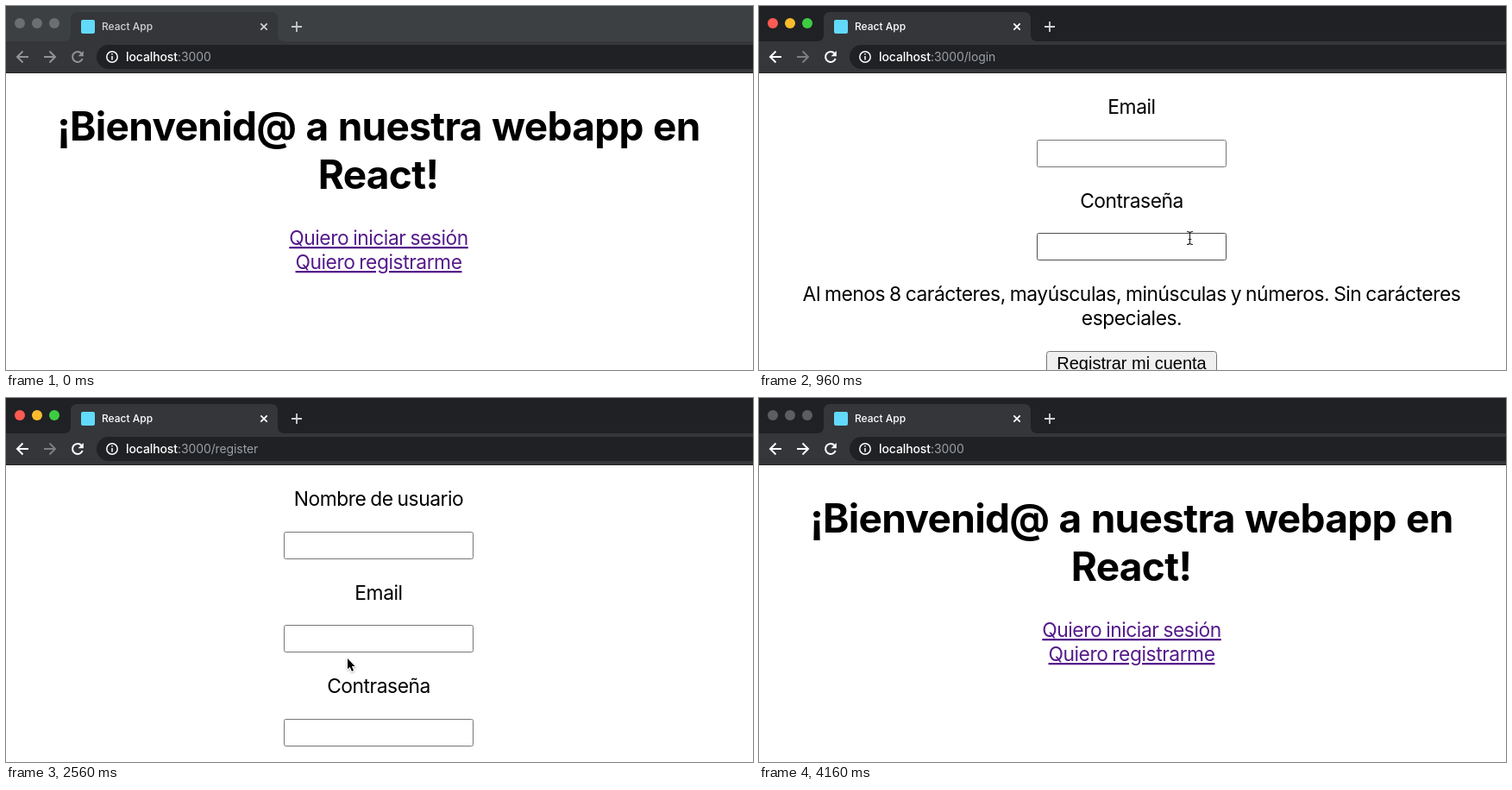
Animation, 866 px wide and 422 px high, one loop 4320 ms. Source, as an HTML page:

```html
<!DOCTYPE html>
<html lang="es">
<head>
<meta charset="utf-8">
<title>React App</title>
<style>
  html, body { margin: 0; width: 100%; height: 100%; overflow: hidden; background: #fff; }
  svg { display: block; width: 866px; height: 422px; }
  text { font-family: Inter, "Open Sans", sans-serif; font-optical-sizing: none; white-space: pre; }
  .mid { text-anchor: middle; }
  .title { font-size: 46px; font-weight: 700; letter-spacing: -.7px; word-spacing: 1px; }
  .copy { font-size: 22.8px; letter-spacing: -.45px; word-spacing: -1px; }
  .link { fill: #551a8b; text-decoration: underline; text-decoration-thickness: 2px; text-underline-offset: 2px; }
  .link.pressed { fill: #f00; }
  .field { fill: #fff; stroke: #767676; }
  .field.hover { stroke: #4f4f4f; }
  .button { font-family: "Liberation Sans", Arial, sans-serif; font-size: 20px; }
  .tab { font-size: 12px; font-weight: 500; }
  .url { font-size: 14px; letter-spacing: -.1px; fill: #9aa0a6; }
  .host { fill: #fff; font-weight: 500; }
  .line { fill: none; stroke-width: 2; }
</style>
</head>
<body>
<svg viewBox="0 0 866 422">
  <defs>
    <filter id="shadow" x="-50%" y="-50%" width="200%" height="200%">
      <feDropShadow dx="0" dy="1" stdDeviation=".8" flood-opacity=".35"/>
    </filter>
    <path id="arrow-left" class="line" d="M26 59H13.5M19.5 52.5L13 59l6.5 6.5"/>
  </defs>

  <rect width="866" height="422" fill="#fff"/>

  <g id="home">
    <text class="mid title" x="432" y="156">¡Bienvenid@ a nuestra webapp en</text>
    <text class="mid title" x="431.5" y="212">React!</text>
    <text class="mid copy link" id="loginLink" x="432" y="277">Quiero iniciar sesión</text>
    <text class="mid copy link" x="432" y="305">Quiero registrarme</text>
  </g>

  <g id="login">
    <text class="mid copy" x="432" y="125">Email</text>
    <rect class="field" x="322.5" y="155.5" width="219" height="31" rx="2"/>
    <text class="mid copy" x="432" y="234">Contraseña</text>
    <rect class="field" id="password" x="322.5" y="263.5" width="219" height="31" rx="2"/>
    <text class="mid copy" x="432" y="342">Al menos 8 carácteres, mayúsculas, minúsculas y números. Sin carácteres</text>
    <text class="mid copy" x="432" y="370">especiales.</text>
    <rect x="333.5" y="400.5" width="197" height="31" rx="3" fill="#efefef" stroke="#767676"/>
    <text class="mid button" x="432" y="421">Registrar mi cuenta</text>
  </g>

  <g id="register">
    <text class="mid copy" x="432" y="125">Nombre de usuario</text>
    <rect class="field" x="322.5" y="155.5" width="219" height="31" rx="2"/>
    <text class="mid copy" x="432" y="234">Email</text>
    <rect class="field" x="322.5" y="263.5" width="219" height="31" rx="2"/>
    <text class="mid copy" x="432" y="342">Contraseña</text>
    <rect class="field" x="322.5" y="372.5" width="219" height="31" rx="2"/>
  </g>

  <rect id="titlebar" width="866" height="42"/>
  <g id="lights">
    <circle cx="16" cy="20" r="6"/><circle cx="36" cy="20" r="6"/><circle cx="56" cy="20" r="6"/>
  </g>
  <path d="M67 41q8 0 8-8V15q0-8 8-8H307q8 0 8 8v18q0 8 8 8H866V78H0V41z" fill="#35363a"/>
  <rect y="77" width="866" height="1" fill="#242528"/>
  <rect x="87" y="16" width="16" height="16" rx="2" fill="#61dafb"/>
  <text class="tab" id="tabText" x="111" y="28">React App</text>
  <path id="close" d="M295.3 20.3l7.4 7.4m0-7.4l-7.4 7.4" stroke-width="1.7"/>
  <path id="plus" d="M331 24h12M337 18v12" stroke-width="1.8"/>

  <circle id="halo" cx="19" cy="59" r="14"/>
  <use id="back" href="#arrow-left"/>
  <use id="forward" href="#arrow-left" transform="translate(70 0) scale(-1 1)"/>
  <g id="reload">
    <path class="line" d="M87.6 55A6 6 0 1 0 88.7 61"/>
    <path d="M89.8 52v6.2h-6.2z" stroke="none"/>
  </g>
  <rect x="105" y="45" width="790" height="28" rx="14" fill="#202124"/>
  <g fill="none" stroke="#fff" stroke-width="1.5">
    <circle cx="123" cy="59" r="6.2"/>
    <path d="M123 58v4.4M123 55v1.6"/>
  </g>
  <text class="url" x="139" y="64"><tspan class="host">localhost</tspan><tspan id="path"></tspan></text>

  <g id="arrow" filter="url(#shadow)">
    <path d="M0 0V12.2L2.7 9.7L4.9 14.8L7 13.9L4.9 8.9H8.6z" fill="#000" stroke="#fff" stroke-width="2" paint-order="stroke" stroke-linejoin="round"/>
  </g>
  <g id="hand" filter="url(#shadow)">
    <path d="M6 10.5V2.3Q6 .8 7.3 .8T8.6 2.3V6.6Q10.6 5.9 11 7.3Q13 6.7 13.3 8.2Q15.2 7.8 15.2 9.8Q15.2 13.2 13.6 14.8V17H7V15.2Q5 13.6 2.4 10.2Q1.5 8.7 2.8 8.2Q4 7.9 6 10.5z" fill="#fff" stroke="#000" stroke-width="1.1"/>
    <path d="M8.6 6.6V9M11 7.3V9.3M13.3 8.2V9.8M8.6 11.5V14.5M10.7 11.5V14.5M12.6 11.5V14.5" stroke="#000" stroke-width=".9"/>
  </g>
  <g id="beam" fill="none">
    <path d="M-3.5 -7.5Q0 -7.5 0 -5.5V5.5Q0 7.5 -3.5 7.5M3.5 -7.5Q0 -7.5 0 -5.5M3.5 7.5Q0 7.5 0 5.5M-1.8 1.5H1.8" stroke="#222" stroke-width="1.1"/>
  </g>
</svg>

<script>
  const STEP = 160, LOOP = 4320;
  const $ = id => document.getElementById(id);

  // Each row: start time, cursor shape, x, y
  const cursorSteps = [
    [0, null], [160, 'arrow', 664, 327.5], [480, 'arrow', 559, 275.5],
    [640, 'hand', 494, 269], [960, 'beam', 499.5, 269],
    [1120, 'beam', 222.5, 188], [1280, 'beam', 154.5, 166],
    [1440, 'beam', 46.5, 101], [1600, 'arrow', 30.5, 80.5],
    [1760, 'arrow', 3.5, 56], [1920, 'beam', 217.5, 178],
    [2080, 'hand', 358, 294], [2240, 'hand', 389, 301],
    [2400, 'arrow', 396, 302], [2720, 'arrow', 277.5, 215.5],
    [2880, 'arrow', 89, 103.5], [3040, 'arrow', 36.5, 71],
    [3200, 'arrow', 26, 65.5], [3520, 'arrow', 75.5, 91.5], [3680, null]
  ];
  const pageSteps = [[0, 'home'], [960, 'login'], [1920, 'home'], [2560, 'register'], [3360, 'home']];
  const paths = { home: ':3000', login: ':3000/login', register: ':3000/register' };
  const lightColors = ['#fc5b53', '#fdbc2d', '#3dcd42'];

  const at = (steps, t) => steps.findLast(step => step[0] <= t);
  const show = (id, on) => $(id).style.display = on ? '' : 'none';
  const paint = (id, prop, color) => $(id).setAttribute(prop, color);

  // The back button lights up at once and fades after the pointer leaves.
  function haloOpacity(t) {
    const fade = leave => Math.max(0, 1 - Math.max(0, t - leave) / 640);
    if (t >= 3200) return fade(3360);
    return t >= 1760 ? fade(1920) : 0;
  }

  function drawChrome(t, page) {
    const focused = t >= 320;
    const icon = focused ? '#fff' : '#929396';
    paint('titlebar', 'fill', focused ? '#202124' : '#3c4043');
    paint('tabText', 'fill', focused ? '#fff' : '#d0d2d5');
    paint('close', 'stroke', focused ? '#fff' : '#d0d2d5');
    paint('plus', 'stroke', focused ? '#d0d2d5' : '#c6c8ca');
    paint('back', 'stroke', icon);
    paint('forward', 'stroke', page === 'home' ? icon : '#7d7e81');
    paint('reload', 'stroke', icon);
    paint('reload', 'fill', icon);
    [...$('lights').children].forEach((light, i) =>
      light.setAttribute('fill', !focused ? '#6c6e70' : t >= 4160 ? '#5d5e60' : lightColors[i]));
    paint('halo', 'fill', t >= 1760 && t < 1920 ? '#535457' : '#48494d');
    paint('halo', 'opacity', haloOpacity(t));
    $('path').textContent = paths[page];
  }

  function draw(t) {
    const page = at(pageSteps, t)[1];
    Object.keys(paths).forEach(name => show(name, name === page));
    $('loginLink').classList.toggle('pressed', t >= 800 && t < 960);
    $('password').classList.toggle('hover', t >= 960 && t < 1120);
    drawChrome(t, page);

    const [, shape, x, y] = at(cursorSteps, t);
    ['arrow', 'hand', 'beam'].forEach(name => show(name, name === shape));
    if (shape) $(shape).setAttribute('transform', `translate(${x} ${y})`);
  }

  const start = performance.now();
  let last = -1;
  function tick() {
    const t = Math.floor((performance.now() - start) % LOOP / STEP) * STEP;
    if (t !== last) draw(last = t);
    requestAnimationFrame(tick);
  }
  tick();
</script>
</body>
</html>
```
